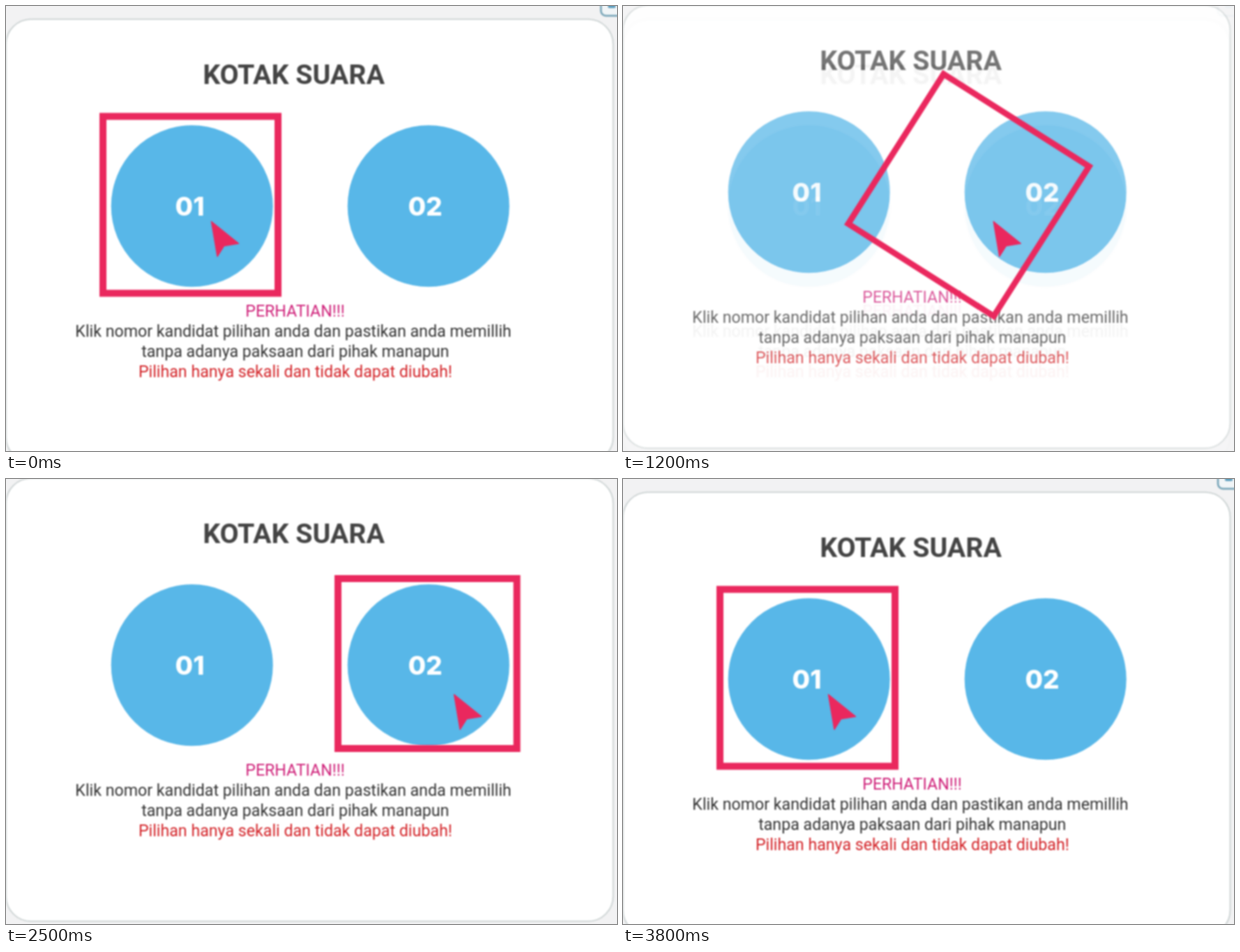
Animation, 876 px wide and 639 px high, one loop 4 s. Source, as an HTML page:

```html
<!DOCTYPE html>
<html lang="id">
<head>
<meta charset="utf-8">
<title>Kotak Suara</title>
<style>
  html, body { margin: 0; width: 100%; height: 100%; overflow: hidden; background: #fff; }
  svg { display: block; width: 876px; height: 639px; }
  text { text-anchor: middle; font-family: Roboto, sans-serif; font-size: 23.2px; fill: #333; }
  .title { font-size: 39.3px; font-weight: 700; fill: #444; }
  .num { font-family: Inter, sans-serif; font-size: 37px; font-weight: 800; fill: #fff; }
  .soft { filter: blur(1.15px); }
  .edge { filter: blur(0.9px); }
</style>
</head>
<body>
<svg viewBox="0 0 876 639">
  <defs>
    <g id="page">
      <rect x="-40" y="-40" width="960" height="780" fill="#f2f2f3"/>
      <g class="soft">
        <rect x="853" y="-30" width="50" height="44" rx="7" fill="#f1f5f7" stroke="#6f9fb3" stroke-width="2.5"/>
        <rect x="863" y="-5" width="11" height="8" rx="2" fill="#5d9dbd"/>
        <rect x="0" y="19" width="870.5" height="636" rx="36" fill="#fff" stroke="#c3cbcb" stroke-width="1.6"/>
      </g>
      <g class="edge" fill="#58b7e8">
        <circle cx="266.7" cy="287.3" r="116"/>
        <circle cx="605.7" cy="287.3" r="116"/>
      </g>
      <g class="soft">
        <text class="title" x="412.5" y="111.5">KOTAK SUARA</text>
        <text class="num" x="263.5" y="301">01</text>
        <text class="num" x="601" y="301">02</text>
        <text x="414.5" y="446" style="fill:#cf2079">PERHATIAN!!!</text>
        <text x="412" y="475">Klik nomor kandidat pilihan anda dan pastikan anda memillih</text>
        <text x="414.8" y="504">tanpa adanya paksaan dari pihak manapun</text>
        <text x="414.8" y="533" style="fill:#d32227">Pilihan hanya sekali dan tidak dapat diubah!</text>
      </g>
    </g>
  </defs>
  <rect width="876" height="639" fill="#fff"/>
  <use id="first" href="#page"/>
  <use id="second" href="#page" y="-20"/>
  <g class="edge">
    <rect id="frame" fill="none" stroke="#ea285e"/>
    <path id="cursor" d="M0 0L39 31.5L18 35L8.5 50Z" fill="#ea285e" stroke="#ea285e" stroke-width="1.5" stroke-linejoin="round"/>
  </g>
</svg>
<script>
  const LOOP = 4000, STEP = 100, LAST = 3800;
  const GO = { start: 348, length: 1380 };
  const BACK = { start: 2500, length: 717 };
  const [first, second, frame, cursor] =
    ["first", "second", "frame", "cursor"].map(id => document.getElementById(id));

  const clamp = v => Math.min(1, Math.max(0, v));
  const mix = (a, b, p) => a + (b - a) * p;
  const ease = p => (1 - Math.cos(Math.PI * p)) / 2;
  const progress = (t, move) => ease(clamp((t - move.start) / move.length));

  const fadeOut = p => clamp(1 - 1.17 * p);
  const fadeIn = p => clamp(1.08 * p);

  function draw(time) {
    const t = Math.min(LAST, Math.floor((time % LOOP) / STEP) * STEP);
    const returning = t >= BACK.start;
    const p = progress(t, returning ? BACK : GO);
    const pos = returning ? 1 - p : p;

    first.setAttribute("opacity", returning ? fadeIn(p) : fadeOut(p));
    second.setAttribute("opacity", returning ? fadeOut(p) : fadeIn(p));

    const w = mix(251, 256.5, pos), h = mix(254, 244, pos);
    frame.setAttribute("x", -w / 2);
    frame.setAttribute("y", -h / 2);
    frame.setAttribute("width", w);
    frame.setAttribute("height", h);
    // the outline thins a little while it turns
    frame.setAttribute("stroke-width", 10 - 1.6 * Math.sin(Math.PI * pos));
    frame.setAttribute("transform",
      `translate(${mix(264.5, 604.2, pos)} ${mix(285.5, 265, pos)}) rotate(${180 * pos})`);
    cursor.setAttribute("transform", `translate(${mix(294.5, 642.5, pos)} 309.5)`);
  }

  const begin = performance.now();
  function tick() {
    draw(performance.now() - begin);
    requestAnimationFrame(tick);
  }
  tick();
</script>
</body>
</html>
```
